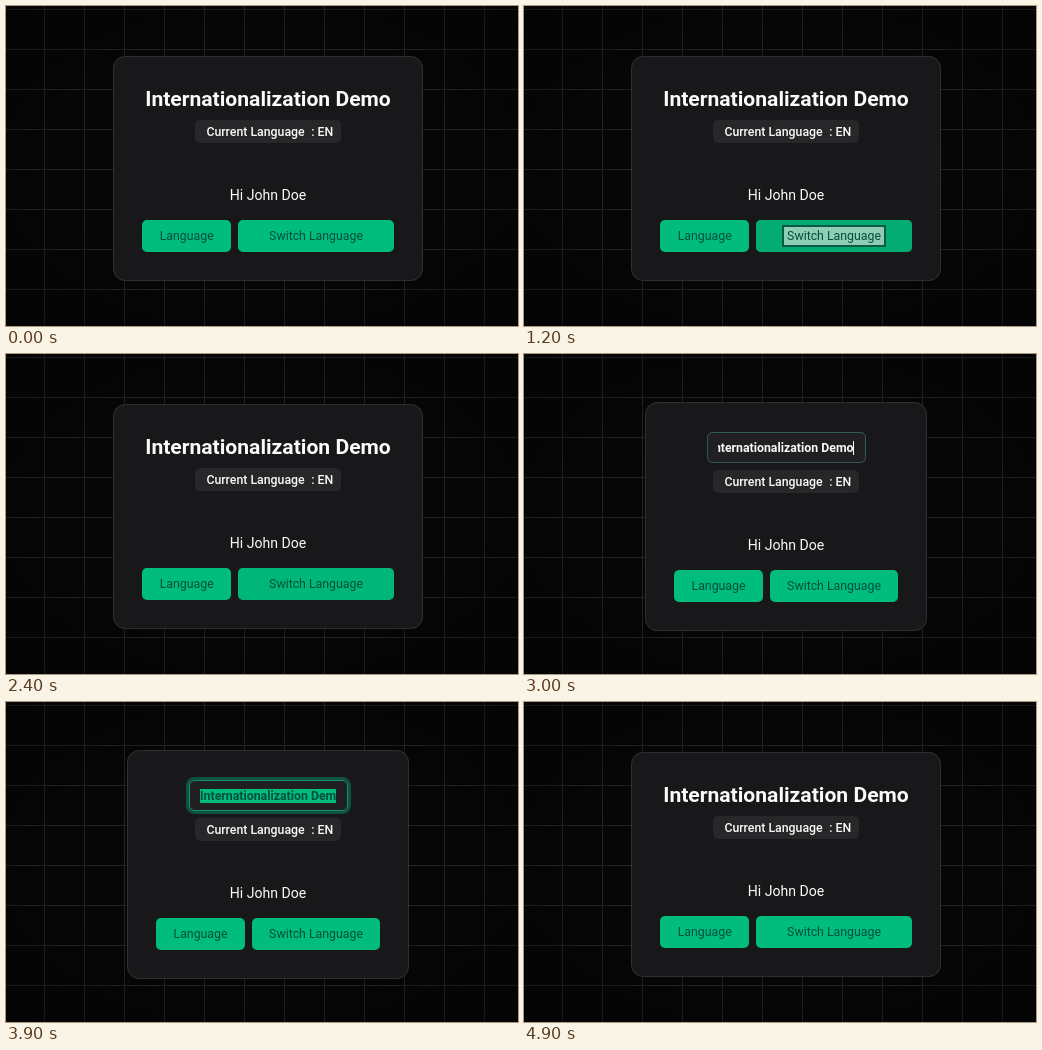
These frames come from a looping animation (512x320 px, 5000 ms). An HTML page:

```html
<!DOCTYPE html>
<html lang="en">
<head>
<meta charset="utf-8">
<title>Internationalization Demo</title>
<style>
  html, body { margin: 0; width: 100%; height: 100%; overflow: hidden; background: #050506; }
  svg { display: block; width: 100vw; height: 100vh; }
  text { font-family: Roboto, "Noto Sans", sans-serif; fill: #fafafa; }
  .title { font-size: 21.12px; font-weight: 700; text-anchor: middle; }
  .badge { font-size: 12.32px; font-weight: 500; }
  .hello { font-size: 14.08px; text-anchor: middle; }
  .label { font-size: 12.32px; text-anchor: middle; fill: #004f3b; }
  .field { font-size: 12.32px; font-weight: 700; }
  .end { text-anchor: end; }
</style>
</head>
<body>
<svg viewBox="0 0 512 320" xmlns="http://www.w3.org/2000/svg">
  <defs>
    <pattern id="grid" x="38" y="3" width="40" height="40" patternUnits="userSpaceOnUse">
      <path d="M0 .5H40M.5 0V40" stroke="#28282a" fill="none"/>
    </pattern>
    <radialGradient id="shade" r="0.71">
      <stop offset="0.2" stop-color="#000" stop-opacity="0"/>
      <stop offset="1" stop-color="#000" stop-opacity="0.4"/>
    </radialGradient>
    <clipPath id="inner"><rect x="194" y="80" width="136.5" height="28"/></clipPath>
  </defs>
  <rect width="512" height="320" fill="#070708"/>
  <rect width="512" height="320" fill="url(#grid)"/>
  <rect width="512" height="320" fill="url(#shade)"/>
  <g id="scene"></g>
</svg>
<script>
const LOOP = 5000, STEP = 100;
const GREEN = '#00bc7d', HOVER = '#02ac73';
const TITLE = 'Internationalization Demo';

// Boxes are [x, y, width, height].
const en = {
  card: [107, 50, 310, 225],
  title: [[262, 100, TITLE]],
  badge: [189, 114, 146, 23], badgeText: [200.4, 'Current Language'], code: [327.2, ': EN'],
  hello: [194, 'Hi John Doe'],
  first: [136, 214, 89, 32], firstText: [180.7, 'Language'],
  second: [232, 214, 156, 32], secondText: [310, 'Switch Language'],
  mark: [258, 219, 104, 22], frame: true
};
const uk = {
  card: [66, 36, 392, 253],
  title: [[263, 86, 'Демонстрація'], [261, 114, 'Інтернаціоналізації']],
  badge: [196, 128, 132, 23], badgeText: [207.4, 'Поточна Мова'], code: [320.2, ': UK'],
  hello: [208, 'Вітаю John Doe'],
  first: [95, 228, 66, 32], firstText: [128, 'Мова'],
  second: [168, 228, 261, 32], secondText: [298.5, 'Змінити Мову'],
  mark: [255, 235, 87, 18], frame: false
};
const edit = {
  ...en,
  card: [121, 48, 282, 229],
  title: [],
  badge: [189, 116, 146, 23],
  hello: [196, 'Hi John Doe'],
  first: [150, 216, 89, 32], firstText: [194.5, 'Language'],
  second: [246, 216, 128, 32]
};

const clamp = v => Math.max(0, Math.min(1, v));
const ramp = (t, from, to) => clamp((t - from) / (to - from));
// Rises from a to b, then falls from c to d.
const pulse = (t, a, b, c, d) => Math.min(ramp(t, a, b), 1 - ramp(t, c, d));

const rect = ([x, y, w, h], r, fill, extra = '') =>
  `<rect x="${x}" y="${y}" width="${w}" height="${h}" rx="${r}" fill="${fill}" ${extra}/>`;
const outline = ([x, y, w, h], r, color, width, opacity = 1) =>
  rect([x + width / 2, y + width / 2, w - width, h - width], r, 'none',
    `stroke="${color}" stroke-width="${width}" opacity="${opacity}"`);
const text = (x, y, kind, str, extra = '') =>
  `<text x="${x}" y="${y}" class="${kind}" ${extra}>${str}</text>`;

function drawField(t) {
  const box = [183, 78, 159, 31];
  const ring = pulse(t, 3300, 3600, 4400, 4700);
  const selecting = t >= 3800 && t < 4500;
  const scrolled = t < 3900;
  const from = scrolled ? 262 : 194;
  const words = scrolled
    ? text(329.5, 98, 'field end', TITLE)
    : text(194, 98, 'field', TITLE, selecting ? 'style="fill:#004f3b"' : '');
  return outline([180, 75, 165, 37], 7, GREEN, 3, 0.36 * ring)
    + rect(box, 5, '#202023')
    + outline(box, 5, '#3f3f46', 1)
    + outline(box, 5, GREEN, 1, 0.65 * ramp(t, 2900, 3200))
    + (selecting ? rect([from, 87, 330 - from, 14], 0, GREEN) : '')
    + `<g clip-path="url(#inner)">${words}</g>`
    + (t < 3800 ? rect([329, 87, 1, 14], 0, '#fafafa') : '');
}

function drawMark(s, level) {
  if (!level) return '';
  const body = rect(s.mark, 0, s.frame ? '#8fcdb5' : '#79b7a0')
    + (s.frame ? outline(s.mark, 0, '#075a41', 2) : '');
  return `<g opacity="${level}">${body}</g>`;
}

function draw(t) {
  const s = t >= 1300 && t < 2300 ? uk : t >= 3000 && t < 4600 ? edit : en;
  const hover = pulse(t, 300, 900, 2200, 2500);
  const mark = Math.max(pulse(t, 900, 1200, 1200, 1500), pulse(t, 2000, 2100, 2200, 2400));
  const badgeY = s.badge[1] + 16, labelY = s.first[1] + 20;
  return rect(s.card, 12.3, '#18181b')
    + outline(s.card, 12, '#2f2f31', 1)
    + s.title.map(([x, y, str]) => text(x, y, 'title', str)).join('')
    + (s === edit ? drawField(t) : '')
    + rect(s.badge, 5, '#27272a')
    + text(s.badgeText[0], badgeY, 'badge', s.badgeText[1])
    + text(s.code[0], badgeY, 'badge end', s.code[1])
    + text(262, s.hello[0], 'hello', s.hello[1])
    + rect(s.first, 5, GREEN)
    + text(s.firstText[0], labelY, 'label', s.firstText[1])
    + rect(s.second, 5, GREEN)
    + rect(s.second, 5, HOVER, `opacity="${hover}"`)
    + drawMark(s, mark)
    + text(s.secondText[0], labelY, 'label', s.secondText[1]);
}

const scene = document.getElementById('scene');
const start = performance.now();
let shown = -1;

function tick() {
  const t = Math.floor(((performance.now() - start) % LOOP) / STEP) * STEP;
  if (t !== shown) {
    scene.innerHTML = draw(t);
    shown = t;
  }
  requestAnimationFrame(tick);
}
tick();
</script>
</body>
</html>
```
